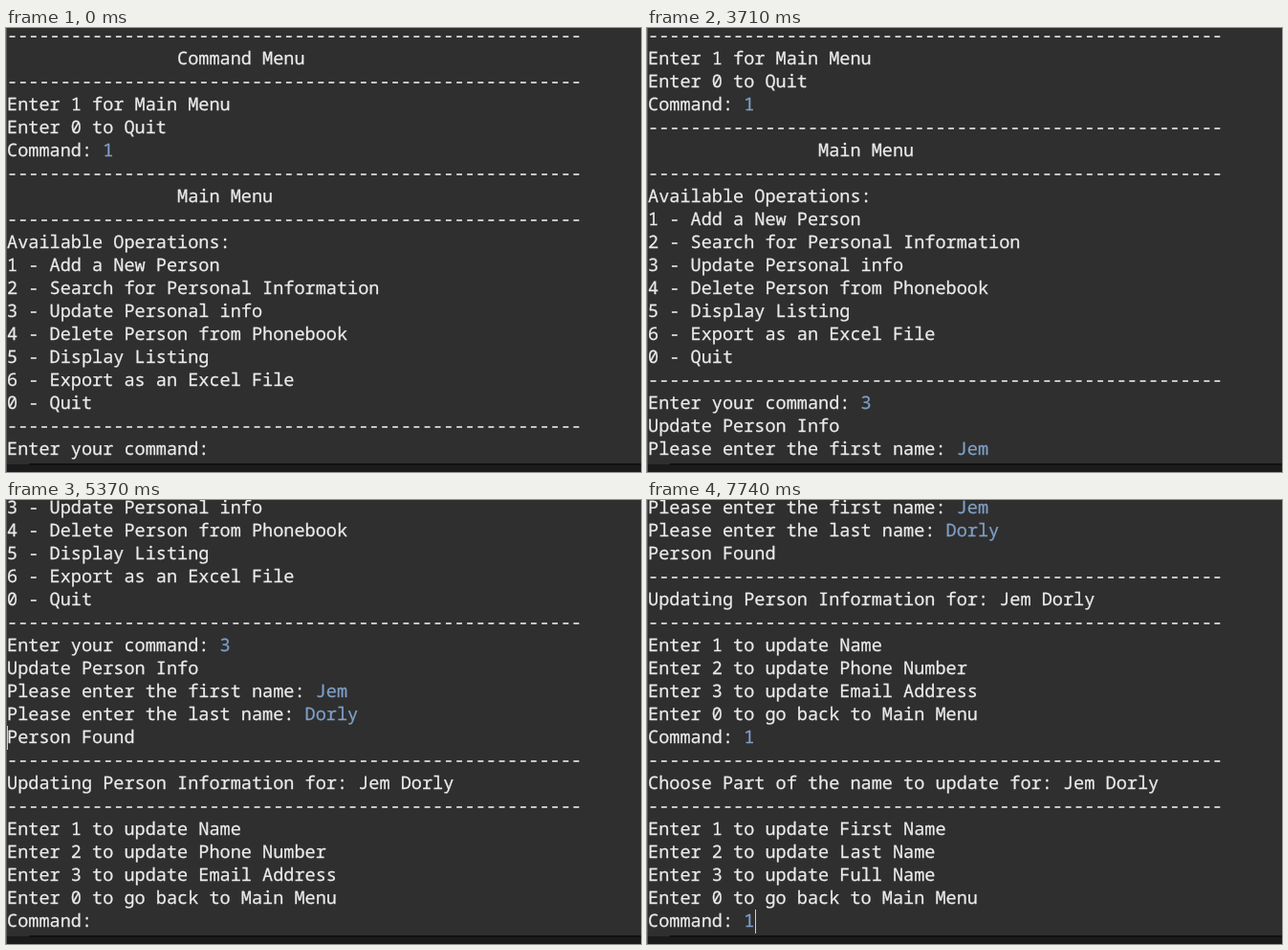
These frames come from a looping animation (664x464 px, 8000 ms). An HTML page:

```html
<!DOCTYPE html>
<html lang="en">
<head>
<meta charset="utf-8">
<title>Phonebook console</title>
<style>
  html, body { margin: 0; width: 100%; height: 100%; overflow: hidden; background: #2f2f2f; }
  #stage { position: relative; width: 664px; height: 464px; overflow: hidden; }
  #console { position: absolute; left: 1px; top: -4px; }
  pre {
    margin: 0;
    font: 18.56px/24px "Noto Sans Mono", monospace;
    text-rendering: geometricPrecision;
    -webkit-text-stroke: 0.25px;
    color: #ebebeb;
  }
  pre b { font-weight: normal; color: #7f9fc6; }
  #cursor { position: absolute; width: 1px; height: 25px; background: #d0d0d0; }
  #footer { position: absolute; left: 0; top: 456px; width: 100%; height: 8px; background: #1b1b1b; }
  #footer::before { content: ""; position: absolute; left: 24px; right: 0; top: -1px; height: 2px; background: #111; }
  #edge { position: absolute; left: 0; top: 0; width: 1px; height: 100%; background: #5a5a5a; }
</style>
</head>
<body>
<div id="stage">
  <div id="console"><pre id="text"></pre><div id="cursor"></div></div>
  <div id="footer"></div>
  <div id="edge"></div>
</div>
<script>
const LOOP = 8000, ROW = 24, COL = 11.14, LAST_ROW = 18;
const OFF = -1, END = -2, BLANK = -1;
const rule = "-".repeat(54);
const indent = " ".repeat(16);

// "~" separates a prompt from what the user types after it
const lines = `${rule}
${indent}Command Menu
${rule}
Enter 1 for Main Menu
Enter 0 to Quit
Command: ~1
${rule}
${indent}Main Menu
${rule}
Available Operations:
1 - Add a New Person
2 - Search for Personal Information
3 - Update Personal info
4 - Delete Person from Phonebook
5 - Display Listing
6 - Export as an Excel File
0 - Quit
${rule}
Enter your command: ~3
Update Person Info
Please enter the first name: ~Jem
Please enter the last name: ~Dorly
Person Found
${rule}
Updating Person Information for: Jem Dorly
${rule}
Enter 1 to update Name
Enter 2 to update Phone Number
Enter 3 to update Email Address
Enter 0 to go back to Main Menu
Command: ~1
${rule}
Choose Part of the name to update for: Jem Dorly
${rule}
Enter 1 to update First Name
Enter 2 to update Last Name
Enter 3 to update Full Name
Enter 0 to go back to Main Menu
Command: ~1`.split("\n").map(line => line.split("~"));

// [start ms, last line, letters typed on it, cursor: line start, END or OFF]
const steps = [
  [0, 18, 0, OFF], [150, 18, 0, END], [700, 18, 1, END],
  [1070, 20, 0, 19], [1570, 20, 0, OFF], [2080, 20, 0, 19], [2670, 20, 0, OFF], [3180, 20, 0, 19],
  [3310, 20, 1, END], [3440, 20, 2, END], [3580, 20, 3, END], [3710, 20, 3, OFF],
  [3860, 21, 0, 21], [4140, 21, 1, END], [4290, 21, 2, END], [4440, 21, 3, END],
  [4590, 21, 4, END], [4720, 21, 5, END],
  [5220, 22, BLANK, 22], [5370, 30, 0, 22], [5770, 30, 0, OFF], [6400, 30, 1, END],
  [6680, 31, BLANK, 31], [6800, 38, 0, 31], [7200, 38, 0, OFF], [7740, 38, 1, END]
];

const $ = id => document.getElementById(id);
const screen = $("console"), text = $("text"), cursor = $("cursor");
const markup = (prompt, input = "") => prompt + (input && `<b>${input}</b>`);

function show([, last, typed, caret]) {
  const [prompt, input = ""] = typed === BLANK ? [""] : lines[last];
  const shown = lines.slice(0, last).map(line => markup(...line));
  text.innerHTML = [...shown, markup(prompt, input.slice(0, typed))].join("\n");

  // a fresh empty line stops 3px short of a full row scroll
  const scroll = (last - LAST_ROW) * ROW - (typed === BLANK ? 3 : 0);
  screen.style.transform = `translateY(${-scroll}px)`;

  const atEnd = caret === END;
  cursor.style.display = caret === OFF ? "none" : "block";
  cursor.style.left = Math.round(0.4 + COL * (atEnd ? prompt.length + typed : 0)) + "px";
  cursor.style.top = (atEnd ? last : caret) * ROW + "px";
}

let current;
function frame() {
  const time = performance.now() % LOOP;
  const step = steps.findLast(([start]) => start <= time);
  if (step !== current) show(current = step);
  requestAnimationFrame(frame);
}
frame();
</script>
</body>
</html>
```
